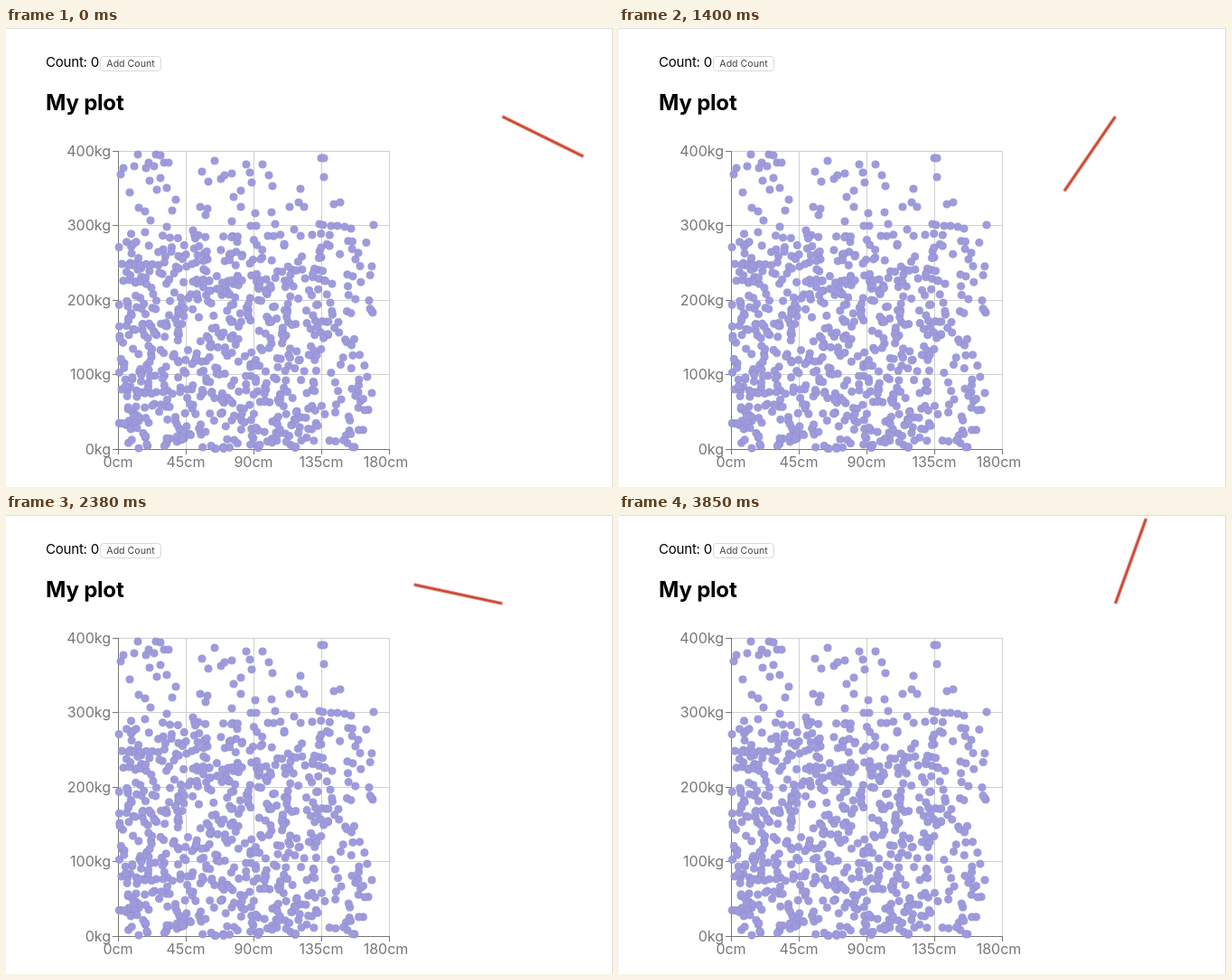
An HTML page that plays this animation: 672 by 508 pixels, repeating every 3920 ms.

```html
<!DOCTYPE html>
<html lang="en">
<head>
<meta charset="utf-8">
<title>My plot</title>
<style>
  html, body { margin: 0; width: 100%; height: 100%; overflow: hidden; background: #fff; }
  svg { display: block; width: 672px; height: 508px; font-family: Inter, "Liberation Sans", sans-serif; }
  .count { font-size: 15px; letter-spacing: -.2px; }
  .title { font-size: 24px; font-weight: 700; letter-spacing: -.2px; }
  .button { font-size: 10.6px; fill: #444; }
  .labels { font-size: 16px; fill: #777; }
  .lines { shape-rendering: crispEdges; fill: none; }
  .dots { fill: #9e9bdd; stroke: #918fcd; stroke-width: .7; }
  .hand {
    transform-origin: 549.5px 98px;
    animation: turn 3920ms infinite;
  }
  /* The hand advances once every 70 ms. */
  @keyframes turn {
    0% { transform: rotate(26.2deg); animation-timing-function: steps(12); }
    21.42857% { transform: rotate(86.8deg); animation-timing-function: steps(8); }
    35.71428% { transform: rotate(124.4deg); animation-timing-function: steps(5); }
    44.64285% { transform: rotate(148.7deg); animation-timing-function: steps(9); }
    60.71428% { transform: rotate(192.1deg); animation-timing-function: steps(13); }
    83.92857% { transform: rotate(254deg); animation-timing-function: steps(8); }
    98.21428%, 100% { transform: rotate(289.9deg); }
  }
</style>
</head>
<body>
<svg viewBox="0 0 672 508">
  <path class="lines" d="M0 .5H671.5V508" stroke="#dedede"/>
  <text class="count" x="44" y="43">Count: 0</text>
  <rect x="104.5" y="31.5" width="67" height="16" rx="3.5" fill="#fff" stroke="#d9d9d9"/>
  <text class="button" x="138" y="43.2" text-anchor="middle">Add Count</text>
  <text class="title" x="44" y="91">My plot</text>
  <g class="lines" id="lines"></g>
  <g class="labels" id="labels"></g>
  <g class="dots" id="dots"></g>
  <rect class="hand" x="549.5" y="96.4" width="100" height="3.2" fill="#cb452e"/>
</svg>
<script>
  const byId = id => document.getElementById(id);

  function add(parent, tag, attrs, text = "") {
    const el = document.createElementNS("http://www.w3.org/2000/svg", tag);
    for (const key in attrs) el.setAttribute(key, attrs[key]);
    el.textContent = text;
    byId(parent).append(el);
  }

  const line = (d, stroke) => add("lines", "path", { d, stroke });
  const dot = (cx, cy) => add("dots", "circle", { cx, cy, r: 4.1 });

  for (let i = 0; i < 5; i++) {
    const x = 124 + 75 * i, y = 466 - 82.5 * i;
    line(`M124 ${y}H424M${x} 136V466`, "#d0d0d0");
    line(`M118 ${y}H124M${x} 466V472`, "#777");
    add("labels", "text", { x: 116, y: y + 5.5, "text-anchor": "end" }, `${100 * i}kg`);
    add("labels", "text", { x: Math.min(x, 420.5), y: 486, "text-anchor": "middle" }, `${45 * i}cm`);
  }
  line("M124 136V466H424", "#777");

  // Sparse points near the top and right edges.
  const outliers = [
    127,162, 130,155, 137,182, 142,153, 146,140, 147,199, 154,203, 160,213, 155,155, 158,149,
    159,169, 164,153, 166,140, 171,141, 167,179, 171,166, 175,149, 180,149, 178,177, 178,220,
    184,202, 188,190, 217,159, 215,198, 223,200, 221,207, 224,170, 231,147, 238,167, 242,163,
    250,161, 252,187, 260,180, 260,198, 250,214, 266,151, 270,160, 272,171, 276,205, 284,151,
    291,163, 295,175, 294,204, 314,198, 324,193, 330,198, 326,178, 349,144, 352,144, 352,165,
    363,195, 370,193, 407,218, 347,217, 351,218, 360,219, 367,219, 375,220, 382,222, 319,223,
    298,217, 277,219, 271,219, 207,224, 406,315, 405,404
  ];
  for (let i = 0; i < outliers.length; i += 2) dot(outliers[i], outliers[i + 1]);

  let seed = 41;
  const random = () => (seed = seed * 48271 % 2147483647) / 2147483647;

  // Points per 50 kg band, left to right.
  const edges = [125, 200, 274, 349, 405];
  const density = [
    [26, 28, 20, 10],
    [36, 40, 38, 14],
    [52, 28, 32, 16],
    [32, 34, 33, 12],
    [44, 34, 34, 16],
    [42, 36, 44, 15]
  ];
  density.forEach((band, row) => band.forEach((count, col) => {
    const top = row ? 219 + 41.2 * row : 226;
    const bottom = 219 + 41.2 * (row + 1);
    for (let i = 0; i < count; i++) {
      dot(edges[col] + random() * (edges[col + 1] - edges[col]), top + random() * (bottom - top));
    }
  }));
</script>
</body>
</html>
```
